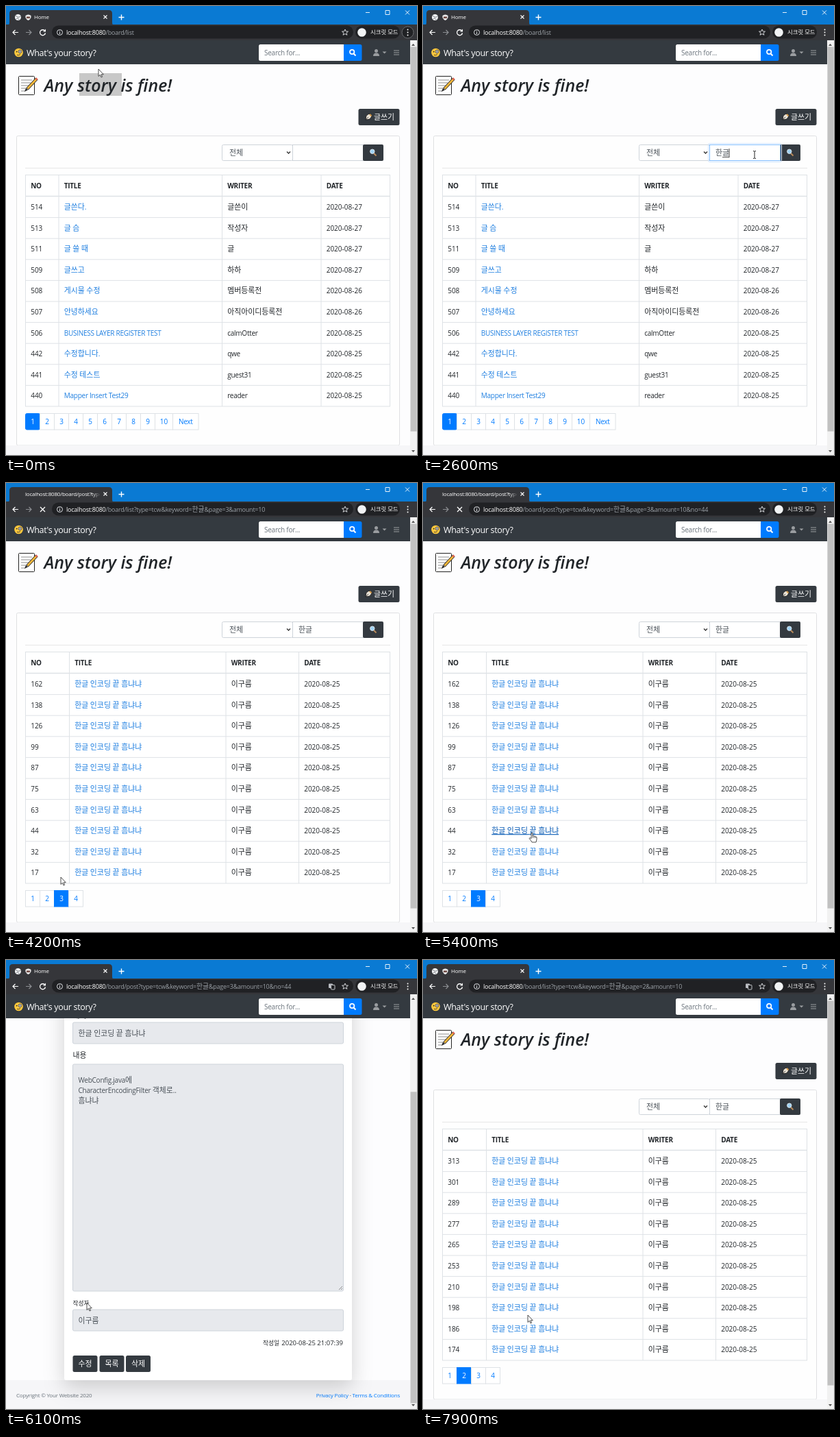
An HTML page that plays this animation: 600x655 px, repeating every 8000 ms.

```html
<!DOCTYPE html>
<html lang="ko">
<head>
<meta charset="utf-8">
<title>Story board</title>
<style>
html, body { margin: 0; width: 100%; height: 100%; overflow: hidden; background: #fdfdfe; }
svg { display: block; width: 600px; height: 655px; }
text { font-family: "Open Sans", "Noto Sans CJK KR", "Noto Sans CJK", sans-serif; white-space: pre; }
.latin { letter-spacing: -.025em; }
.ko { font-size: 1.09em; letter-spacing: 0; }
.card { filter: drop-shadow(0 10px 15px rgba(0, 0, 0, .175)); }
.hover text { fill: #0056b3; text-decoration: underline; }
.hover rect { fill: #e9ecef; }
</style>
</head>
<body>
<svg id="stage" viewBox="0 0 600 655"></svg>
<script>
const INK = '#212529', DARK = '#343a40', BLUE = '#007bff', LINE = '#dee2e6', FIELD = '#ced4da', GREY = '#495057';

const escape = s => s.replace(/&/g, '&amp;');
const hangul = s => escape(s).replace(/[\u3131-\ud7a3]+/g, '<tspan class="ko">$&</tspan>');
const text = (s, x, y, size = 10, fill = INK, more = '') =>
  `<text x="${x}" y="${y}" font-size="${size}" fill="${fill}" ${/[a-z]/i.test(s) ? 'class="latin"' : ''} ${more}>${hangul(s)}</text>`;
const box = (x, y, w, h, fill, stroke = 'none', r = 0) =>
  `<rect x="${x}" y="${y}" width="${w}" height="${h}" fill="${fill}" stroke="${stroke}" rx="${r}"/>`;
const line = (d, stroke, width = 1, more = '') =>
  `<path d="${d}" fill="none" stroke="${stroke}" stroke-width="${width}" ${more}/>`;
const shape = (d, fill, more = '') => `<path d="${d}" fill="${fill}" ${more}/>`;
const dot = (x, y, r, fill, more = '') => `<circle cx="${x}" cy="${y}" r="${r}" fill="${fill}" ${more}/>`;
const group = (id, body, more = '') => `<g id="${id}" ${more}>${body}</g>`;

const middle = 'text-anchor="middle"', end = 'text-anchor="end"', bold = 'font-weight="700"';

const footer = y => box(0, y, 590, 42, '#f6f6f8') +
  text('Copyright © Your Website 2020', 15, y + 25, 8, '#6c757d') +
  `<text x="575" y="${y + 25}" font-size="8" class="latin" fill="${BLUE}" ${end}>Privacy Policy <tspan fill="${INK}">·</tspan> Terms &amp; Conditions</text>`;

const memo = box(18.5, 102.5, 23, 27, '#fff', '#222', 1) +
  line('M22 108H38M22 112H36M22 116H34M22 120H31M22 124H28', '#8c8c8c') +
  line('M45 106L31 121', '#222', 4.4) + line('M44.500 106.500L31.500 120.500', '#f5b73b', 2.8) +
  line('M45.500 105.500L43.500 107.500', '#e8685a', 2.8) + shape('M29 120L32 122.500L27 125Z', '#222');

const pen = shape('M525 166L526 160L530 157L534 161L531 165Z', '#e8e1d5', 'stroke="#111" stroke-width=".8"') +
  line('M525 166L529 162', '#222', .8) + line('M531 158L533.500 160.500', '#d99c4a', 2);

const lens = line('M537 215L540.500 218.500', '#b98a5a', 2) +
  dot(534.8, 212.2, 3.2, '#9fd3f5', 'stroke="#dce3ea" stroke-width="1"');

function pager(labels, active) {
  let x = 28.5, out = '';
  for (const label of labels) {
    const w = label === 'Next' ? 37.5 : label.length > 1 ? 26 : 21;
    const on = label === active;
    out += `<g data-page="${label}">` + box(x, 594.5, w, 23.5, on ? BLUE : '#fff', on ? BLUE : LINE, on && label === '1' ? 2 : 0) +
      text(label, x + w / 2, 610, 10, on ? '#fff' : BLUE, middle) + '</g>';
    x += w;
  }
  return out;
}

function table(columns, rows) {
  const edges = [28.5, ...columns, 560.5];
  let out = box(28.5, 246.5, 532, 337.5, '#fff', LINE) +
    columns.map(x => line(`M${x} 246.500V584`, LINE)).join('') + line('M28 277.500H561', LINE, 1.4);
  ['NO', 'TITLE', 'WRITER', 'DATE'].forEach((h, i) => out += text(h, edges[i] + 7.7, 265.5, 10, INK, bold));
  rows.forEach((row, r) => {
    const y = 297 + 30.6 * r;
    if (r) out += line(`M28 ${y - 19}H561`, LINE);
    row.forEach((cell, i) => out += `<g data-cell="${row[0]}-${i}">` + text(cell, edges[i] + 7.7, y, 10, i === 1 ? '#1f7fe0' : INK) + '</g>');
  });
  return out;
}

const listPage = (id, keyword, columns, rows, labels, active) => group(id,
  (id === 'home' ? `<rect id="selection" x="107" y="98" width="62" height="33" fill="#c8c8c8"/>` : '') +
  memo + `<text x="55.500" y="125" font-size="25" font-weight="600" font-style="italic" fill="${INK}">Any story is fine!</text>` +
  box(514.5, 150, 60, 24, DARK, 'none', 2.5) + pen + text('글쓰기', 537, 166, 10, '#fff') +
  box(15.5, 189.5, 559, 451.5, '#fefefe', '#dfe0e2', 2) +
  box(315.5, 202.5, 103, 23, '#fff', FIELD, 2) + text('전체', 326, 218, 10, GREY) +
  line('M410 212.500L412.500 215L415 212.500', '#333', 1.3) +
  box(418.5, 202.5, 103, 23, '#fff', FIELD) + text(keyword, 427, 218, 10, GREY) +
  box(521, 202, 30, 24, DARK, 'none', 2) + lens + line('M28 236.500H561', '#e6e6e6') +
  table(columns, rows) + pager(labels, active) + footer(641));

const homeRows = [
  ['514', '글쓴다.', '글쓴이', 27], ['513', '글 슴', '작성자', 27], ['511', '글 쓸 때', '글', 27],
  ['509', '글쓰고', '하하', 27], ['508', '게시물 수정', '멤버등록전', 26], ['507', '안녕하세요', '아직아이디등록전', 26],
  ['506', 'BUSINESS LAYER REGISTER TEST', 'calmOtter', 25], ['442', '수정합니다.', 'qwe', 25],
  ['441', '수정 테스트', 'guest31', 25], ['440', 'Mapper Insert Test29', 'reader', 25]
].map(([no, title, writer, day]) => [no, title, writer, '2020-08-' + day]);

const TITLE = '한글 인코딩 끝 흠냐냐', WRITER = '이구름';
const found = (id, numbers, page) => listPage(id, '한글', [92.5, 321, 427.5],
  numbers.map(n => [String(n), TITLE, WRITER, '2020-08-25']), ['1', '2', '3', '4'], page);
const countdown = (from, n) => Array.from({ length: n }, (_, i) => from - 12 * i);

const input = (y, h) => box(97.5, y, 395, h, '#e7e9ed', FIELD, 2);
const button = (label, x) => box(x, 754, 36, 24, DARK, 'none', 2.5) + text(label, x + 18, 770, 10, '#fff', middle);
const postPage = group('post', footer(790) +
  `<rect class="card" x="85" y="115" width="420" height="675" rx="3" fill="#fff"/>` +
  box(85, 115, 420, 66, '#f7f7f7', 'none', 3) + line('M85 181H505', '#dfdfdf') +
  text('글 보기', 295, 154, 17, INK, middle + ' font-weight="300"') +
  text('번호', 97.5, 203, 8) + input(207.5, 31) + text('44', 105.5, 227, 10, GREY) +
  text('제목', 97.5, 262, 10) + input(268, 31) + text(TITLE, 105.5, 287.5, 10, GREY) +
  text('내용', 97.5, 320, 10) + input(329, 331) +
  ['WebConfig.java에', 'CharacterEncodingFilter 객체로..', '흠냐냐'].map((s, i) => text(s, 105.5, 356 + 15 * i, 10, GREY)).join('') +
  line('M486 658L491 653M489 658L491 656', '#777', .8) +
  text('작성자', 97.5, 681, 8) + input(687, 31) + text(WRITER, 105.5, 706.5, 10, GREY) +
  text('작성일', 375, 739, 8) + text('2020-08-25 21:07:39', 492, 739, 9.5, INK, end) +
  button('수정', 97.5) + button('목록', 136.5) + button('삭제', 175));

const navbar = box(0, 50, 590, 35, DARK) +
  dot(18.5, 68, 6.3, '#ffc83d') +
  dot(20.5, 66.5, 2.3, '#fff', 'stroke="#333" stroke-width=".9"') + dot(20.5, 66.5, .9, '#222') + dot(15.7, 66.7, .9, '#222') +
  line('M16 71.500Q19 72.500 21 70.500', '#333', .9) +
  text("What's your story?", 30, 73, 12.5, '#fff') +
  box(369, 56, 128, 24, '#fff', 'none', 2.5) + text('Search for...', 377, 72, 10, '#6c757d') +
  box(493, 56, 26.5, 24, BLUE, 'none', 2.5) + box(493, 56, 6, 24, BLUE) +
  dot(505.2, 67, 3.2, 'none', 'stroke="#fff" stroke-width="1.700"') + line('M507.500 69.500L510.500 72.500', '#fff', 2) +
  dot(540.5, 65.5, 2.5, '#9a9da0') + shape('M536 73Q536 68.500 540.500 68.500T545 73Z', '#9a9da0') +
  shape('M549.500 66.500H555.500L552.500 69.500Z', '#9a9da0') + line('M566 65H574M566 68H574M566 71H574', '#9a9da0', 1.2);

const chrome = box(0, 0, 600, 28, '#0a7ad3') + box(0, 27, 600, 23, '#35363a') +
  shape('M2 28Q5 28 5 24V11Q5 6 10 6H150Q155 6 155 11V24Q155 28 158 28Z', '#35363a') +
  group('ready', dot(17.5, 16.5, 4.5, '#f1f3f4') + line('M14 14Q18 18 21 15M15 19Q17 16 19 20', '#6b6f75', .9) +
    shape('M28.500 14Q32.500 11 36.500 14V17Q35 20 32.500 21Q30 20 28.500 17Z', '#e9e9e9') +
    box(30, 15.5, 5, 2.5, '#704b45') + text('Home', 41, 19, 8, '#fff')) +
  group('busy', text('localhost:8080/board/post?type=tcw', 28, 19, 8, '#fff', 'clip-path="url(#tab)"') +
    box(127, 8, 11, 16, 'url(#fade)')) +
  line('M142.500 13.500L147.500 18.500M147.500 13.500L142.500 18.500', '#fff', 1.1) +
  line('M164.500 16.500H172.500M168.500 12.500V20.500', '#fff', 1.4) +
  line('M525 9.500H531M554 6.500H560V12.500H554ZM583 6.500L589 12.500M589 6.500L583 12.500', '#fff', .9) +
  line('M18 38.500H10M13.500 35L10 38.500L13.500 42', '#fff', 1.2) +
  line('M29 38.500H37M33.500 35L37 38.500L33.500 42', '#8b8d91', 1.2) +
  group('reload', line('M56.500 36A4 4 0 1 0 57.500 39.500', '#fff', 1.3) + shape('M58 33.500V37.500H54Z', '#fff')) +
  group('stop', line('M50 35L57 42M57 35L50 42', '#fff', 1.3)) +
  box(67, 28.5, 440, 19, '#202124', 'none', 9.5) +
  dot(78.5, 38.5, 4, 'none', 'stroke="#dfe1e5" stroke-width="1"') + line('M78.500 38V41M78.500 36V37', '#dfe1e5', 1.1) +
  `<text id="url" x="88" y="41.500" font-size="9" class="latin" fill="#9aa0a6"></text>` +
  group('translate', box(471, 34.5, 6, 6.5, '#b9bcc1', 'none', 1) + box(474.5, 36.5, 5.5, 6.5, '#202124', '#c5c8cc', 1)) +
  shape('M495 34L496.300 37L499.500 37.200L497 39.200L497.900 42.300L495 40.600L492.100 42.300L493 39.200L490.500 37.200L493.700 37Z', 'none', 'stroke="#dfe1e5" stroke-width=".9"') +
  box(510, 28.5, 65, 19, '#202124', 'none', 9.5) + dot(519.5, 38.5, 6.3, '#f1f3f4') + text('시크릿 모드', 532, 41.3, 7.7, '#fff') +
  group('ring', dot(586.5, 38.5, 8.5, '#202124', 'stroke="#6a6c70" stroke-width="1"')) +
  [34.5, 38.5, 42.5].map(y => dot(586.5, y, 1, '#fff')).join('');

const scrollbar = box(590, 50, 10, 605, '#f1f1f1') +
  shape('M592 58L594.500 55L597 58Z', '#505050') + shape('M592 648L594.500 651L597 648Z', '#505050') +
  `<rect id="thumb" x="590.500" width="9" fill="#c1c1c1"/>`;

const outline = 'stroke="#222" stroke-width=".8" stroke-linejoin="round"';
const pointers = group('pointer',
  group('arrow', shape('M0 0V10.500L2.400 8.300L4 12L5.600 11.300L4 7.800H7.300Z', '#fff', outline)) +
  group('hand', shape('M-1 1Q0 -.6 1 1V5Q2.500 4.200 3 5.300Q4.500 4.700 5 6Q6.600 5.500 7 7V10Q6.500 12 6 14H0Q-.8 12 -4 8.500Q-3.500 6.700 -1 8.500Z', '#fff', outline) + line('M1 5V8M3 5.500V8M5 6V8', '#222', .6)) +
  group('beam', line('M-2 -5.500Q0 -5.500 0 -4.500Q0 -5.500 2 -5.500M0 -4.500V4.500M-2 5.500Q0 5.500 0 4.500Q0 5.500 2 5.500', '#222', 1)));

const focus = group('focus', box(416.5, 200.5, 107, 27, 'none', '#cfe5ff', 2) +
  box(418.5, 202.5, 103, 23, '#fff', '#80bdff') + group('typed', '') +
  `<rect id="caret" y="208" width=".9" height="13" fill="#222"/><rect id="composing" y="220" width="10" height=".9" fill="#444"/>`);

const pages = ['1', '2', '3', '4', '5', '6', '7', '8', '9', '10', 'Next'];
document.getElementById('stage').innerHTML =
  `<defs><clipPath id="tab"><rect x="28" y="6" width="109" height="20"/></clipPath>
   <linearGradient id="fade"><stop stop-color="#35363a" stop-opacity="0"/><stop offset="1" stop-color="#35363a"/></linearGradient></defs>` +
  box(0, 0, 600, 655, '#fdfdfe') +
  group('content', listPage('home', '', [77, 315.5, 460], homeRows, pages, '1') +
    found('page1', countdown(433, 10), '1') +
    found('page2', [...countdown(313, 6), ...countdown(210, 4)], '2') +
    found('page3', [162, 138, 126, 99, 87, 75, 63, 44, 32, 17], '3') + postPage + focus) +
  navbar + scrollbar + chrome + pointers;

const $ = id => document.getElementById(id);
const show = (id, on) => $(id).style.display = on ? '' : 'none';

// navigation: address change, page shown, load finished
const query = page => `list?type=tcw&keyword=한글&page=${page}&amount=10`;
const visits = [
  { address: 0, shown: 0, loaded: 0, view: 'home', url: 'list' },
  { address: 2800, shown: 2800, loaded: 3100, view: 'page1', url: query(1) },
  { address: 4100, shown: 4100, loaded: 4300, view: 'page3', url: query(3) },
  { address: 5300, shown: 5500, loaded: 5700, view: 'post', url: 'post?type=tcw&keyword=한글&page=3&amount=10&no=44' },
  { address: 6500, shown: 6600, loaded: 6800, view: 'page3', url: 'list?bno=44&page=3&amount=10&type=tcw&keyword=한글' },
  { address: 7600, shown: 7600, loaded: 7800, view: 'page2', url: query(2) }
];
// scroll start, end, distance, reset by the next page
const scrolls = [[3300, 3730, 28, 4100], [5500, 6000, 177, 6600], [6900, 7330, 28, 7600]];
const moves = [
  [0, 135, 92], [100, 135, 92], [900, 390, 190], [1500, 484, 217], [3200, 484, 217], [3500, 259, 414],
  [4000, 80, 575], [4200, 80, 575], [4900, 159, 510], [5500, 159, 510], [6000, 118, 500], [6100, 118, 500],
  [6400, 147, 584], [6900, 147, 584], [7400, 59, 575], [7600, 59, 575], [7900, 153, 518], [8000, 153, 518]
];
const looks = [[0, 'arrow'], [1300, 'beam'], [3300, 'arrow'], [3900, 'hand'], [4200, 'arrow'], [4700, 'hand'],
  [5500, 'arrow'], [6300, 'hand'], [7000, 'arrow'], [7300, 'hand'], [7700, 'arrow']];
const typing = [[0, ''], [2000, 'ㅎ'], [2200, '하'], [2300, '한'], [2400, '한ㄱ'], [2500, '한그'], [2600, '한글']];

const latest = (list, t, key = 0) => list.filter(item => item[key] <= t).pop();
const ease = p => p * p * (3 - 2 * p);
const easeOut = p => 1 - (1 - p) ** 2;

function pointerAt(t) {
  const i = Math.max(1, moves.findIndex(m => m[0] > t));
  const [a, b] = [moves[i - 1], moves[i]];
  const p = ease((t - a[0]) / (b[0] - a[0]));
  return [a[1] + (b[1] - a[1]) * p, a[2] + (b[2] - a[2]) * p];
}

function scrollAt(t) {
  const s = scrolls.find(([from, , , until]) => t >= from && t < until);
  return s ? Math.round(s[2] * easeOut(Math.min(1, (t - s[0]) / (s[1] - s[0])))) : 0;
}

const hovers = [
  ['#page1 [data-page="3"]', 3900, 4100],
  ['#page3 [data-cell="44-1"]', 4800, 5500],
  ['#page3 [data-page="2"]', 7300, 7600]
].map(([selector, from, to]) => ({ node: document.querySelector(selector), from, to }));

function draw(t) {
  const visit = latest(visits, t, 'address'), { view } = latest(visits, t, 'shown');
  for (const id of ['home', 'page1', 'page2', 'page3', 'post']) show(id, id === view);
  const loading = t < visit.loaded;
  show('busy', loading); show('stop', loading);
  show('ready', !loading); show('reload', !loading);
  show('translate', !loading && visit.view !== 'home');
  $('url').innerHTML = '<tspan fill="#fff">localhost:8080</tspan>' + hangul('/board/' + visit.url);

  const scroll = scrollAt(t), height = view === 'post' ? 782 : 633;
  $('content').setAttribute('transform', `translate(0 ${-scroll})`);
  $('thumb').setAttribute('y', 59.5 + 587 * scroll / height);
  $('thumb').setAttribute('height', 587 * 605 / height);

  show('selection', t < 500);
  show('ring', t < 200);
  show('focus', t >= 1500 && t < 2800);
  const typed = latest(typing, t)[1], caretX = 427 + 10 * typed.length;
  $('typed').innerHTML = text(typed, 427, 218, 10, GREY);
  $('caret').setAttribute('x', caretX - .5);
  $('composing').setAttribute('x', caretX - 10);
  show('composing', typed);

  const look = latest(looks, t)[1];
  for (const id of ['arrow', 'hand', 'beam']) show(id, id === look);
  $('pointer').setAttribute('transform', `translate(${pointerAt(t)})`);
  for (const { node, from, to } of hovers) node.classList.toggle('hover', t >= from && t < to);
}

// the picture advances in tenths of a second
const start = performance.now();
let last = -1;
function tick(now) {
  const t = Math.floor(Math.max(0, now - start) % 8000 / 100) * 100;
  if (t !== last) draw(last = t);
  requestAnimationFrame(tick);
}
draw(0);
requestAnimationFrame(tick);
</script>
</body>
</html>
```
